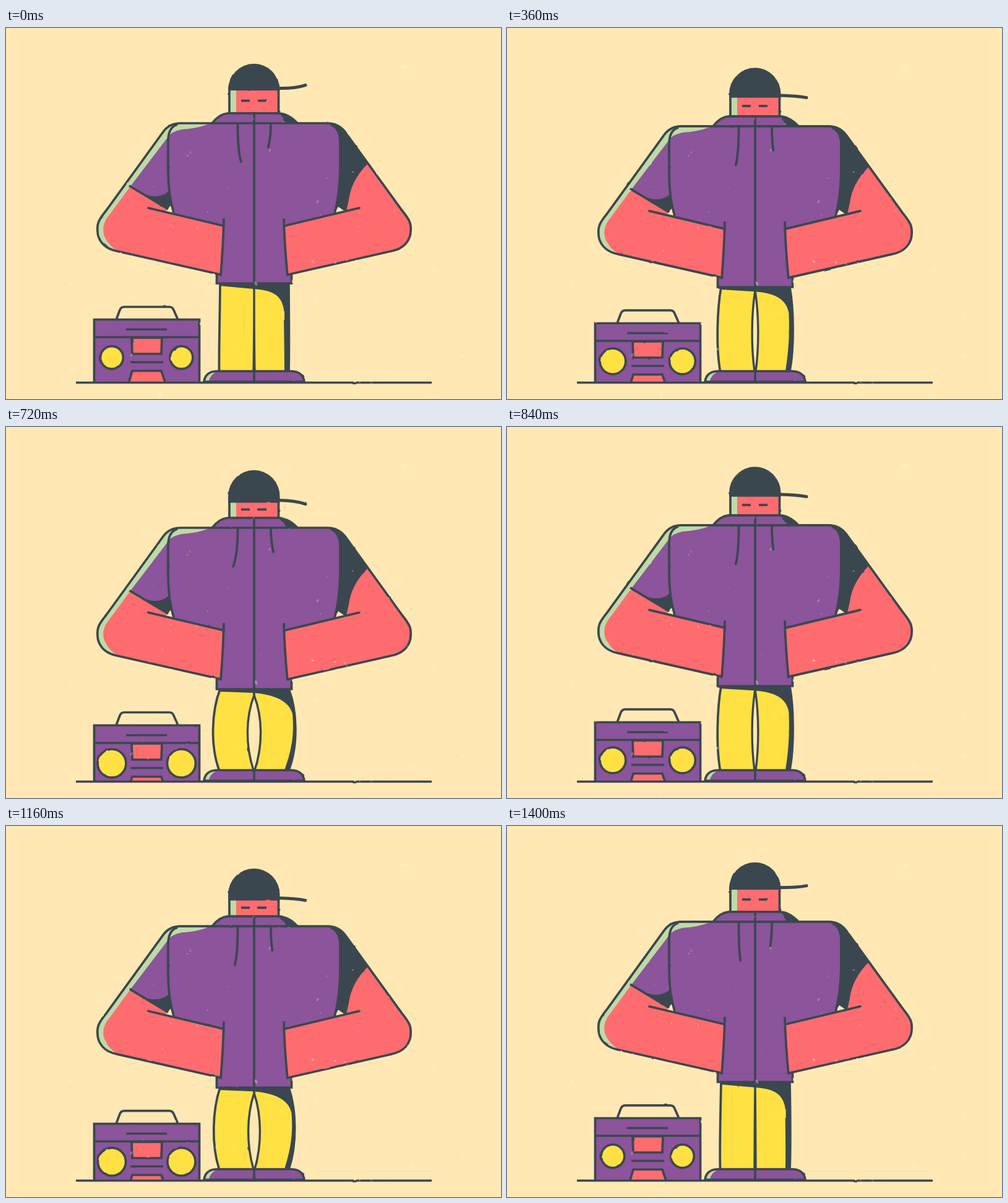
An HTML page with a canvas that plays this animation: 800x600 px, repeating every 1440 ms.

```html
<!DOCTYPE html>
<html lang="en">
<head>
<meta charset="utf-8">
<title>Boombox bounce</title>
<style>
  html, body { margin: 0; width: 100%; height: 100%; overflow: hidden; background: #ffe8b3; }
  canvas { display: block; filter: url(#rough); }
  svg { position: absolute; }
</style>
</head>
<body>
<svg width="0" height="0">
  <filter id="rough" x="0" y="0" width="100%" height="100%" color-interpolation-filters="sRGB">
    <feTurbulence type="fractalNoise" baseFrequency=".07" numOctaves="1" seed="4"/>
    <feDisplacementMap in="SourceGraphic" scale="2.2" xChannelSelector="R" yChannelSelector="G"/>
    <feGaussianBlur stdDeviation=".4" edgeMode="duplicate"/>
  </filter>
</svg>
<canvas width="800" height="600"></canvas>
<script>
const ctx = document.querySelector('canvas').getContext('2d');
const LOOP = 1440, BEAT = 480, STEP = 40;
const CREAM = '#ffe8b3', INK = '#3b474f', PURPLE = '#8b549b',
      RED = '#ff6c70', YELLOW = '#ffe144', GREEN = '#bfdaa5';

const fill = (d, color) => { ctx.fillStyle = color; ctx.fill(new Path2D(d)); };
const line = (d, width = 3.7) => { ctx.lineWidth = width; ctx.stroke(new Path2D(d)); };
const shape = (d, color) => { fill(d, color); line(d); };
const shifted = (dy, draw) => { ctx.save(); ctx.translate(0, dy); draw(); ctx.restore(); };

let seed = 7;
const random = () => (seed = seed * 16807 % 2147483647) / 2147483647;
const specks = Array.from({ length: 130 }, () => ({
  x: random() * 800, y: random() * 600, r: .6 + random() ** 3 * 1.8,
  angle: random() * 3, alpha: .08 + random() * .35
}));

function paper() {
  for (const { x, y, r, angle, alpha } of specks) {
    ctx.fillStyle = `rgba(255,246,220,${alpha})`;
    ctx.beginPath();
    ctx.ellipse(x, y, r * 1.7, r, angle, 0, 7);
    ctx.fill();
  }
}

function boombox(s) {
  ctx.save();
  ctx.beginPath();
  ctx.rect(130, 440, 200, 133);
  ctx.clip();
  shifted(10.5 * s, () => line('M178 472L184 456Q186 451 191 451H264Q269 451 271 456L278 472'));
  shifted(11 * s, () => {
    shape('M142.5 471.5H312.5V600H142.5Z', PURPLE);
    line('M142 500H313M194 487.5H260M201 540.5H254');
    shape('M203 501H252L251 527H204Z', RED);
    shape('M204 554.5H251L258 575H198Z', RED);
    for (const x of [171, 283.5]) {
      ctx.beginPath();
      ctx.arc(x, 533, 18.4 + 4.6 * s, 0, 7);
      ctx.fillStyle = YELLOW;
      ctx.fill();
      ctx.stroke();
    }
  });
  ctx.restore();
}

function legs(s) {
  const hip = 413 + 11 * s, bulge = 10.5 * s ** 1.3, c = bulge * 4 / 3;
  const y1 = hip + 36, y2 = 516, split = hip + 10 * s;
  const left = `C${346 - c} ${y1} ${344 - c} ${y2} 344.5 555`;
  const right = `C${457 + c} ${y1} ${458 + c} ${y2} 457 555`;
  const gap = `M401 ${split}C${401 - c} ${y1 + 10} ${401 - c} ${y2} 400 555H402` +
              `C${401 + c} ${y2} ${401 + c} ${y1 + 10} 401 ${split}`;
  const edge = 449 + bulge * 1.35;
  fill(`M346 ${hip}${left}H457C${458 + c} ${y2} ${457 + c} ${y1} 457 ${hip}Z`, YELLOW);
  fill(`M346 ${hip}H457${right}H450C${450 + c} ${y2} ${edge + bulge * .2} ${hip + 70} ${edge} ${hip + 42}` +
       `C${edge - 4} ${hip + 17} 428 ${hip + 11 - 3 * s} 400 ${hip + 9 - 3 * s}L346 ${hip + 4}Z`, INK);
  fill(gap, CREAM);
  line(`M346 ${hip}${left}M457 ${hip}${right}M401 ${hip}V${split}`);
  line(gap, 3.4);
}

function shoes() {
  const sole = 'M320 572Q322 556 340 555H462Q480 556 482 572Z';
  fill(sole, PURPLE);
  fill('M322 571Q324 557 340 556Q329 562 328 571Z', GREEN);
  line(sole);
  line('M401 555V572');
  line('M113 573.5H688');
}

function head(s, swing) {
  const top = 58 + 12 * s, base = 101 + 21.5 * s, chin = 138 + 9.5 * s;
  const eyes = 117.5 + 16 * s, brim = 97.5 + 21 * s;
  const face = `M361 ${base - 4}H440.5V${chin}H361Z`;
  fill(face, RED);
  fill(`M361 ${base - 4}H372V${chin}H361Z`, GREEN);
  line(face);
  fill(`M359 ${base}V${top + 42}A41.5 42 0 0 1 442.5 ${top + 42}V${base}Z`, INK);
  line(`M380 ${eyes}H394M407 ${eyes}H421`);
  ctx.lineCap = 'round';
  line(`M440 ${brim}Q468 ${brim + .5} 484 ${brim + .5 + 6.5 * swing}`, 5);
  ctx.lineCap = 'butt';
}

function torso(s, swing) {
  const hem = 413 + 2 * s;
  const arms = 'M348 399L180 361C164 358 152 349 148.5 334C146 317 149 311 162 295L254 168' +
               'Q264 154 282 154H520Q537 154 548 168L640 295C653 311 656 317 653.5 334C650 349 638 358 622 361L455 399';
  const chest = 'M282 154H520Q540 160 540 184V230Q539 270 531 300L450 320L455 400H347L352 320' +
                'L271 300Q262 270 262 230V184Q262 160 282 154Z';
  const collar = 'M333 154Q345 139 358 138H440Q456 138 471 154';

  shape(`M340.5 398H461.5V${hem}H340.5Z`, PURPLE);
  fill(arms, RED);

  fill('M199 255L218 219L254 168Q264 154 282 154L270 286L262 293Z', PURPLE);
  fill('M222 268Q247 278 263 264L270 286L262 294Z', INK);
  fill('M520 154Q537 154 548 168L585 219Q558 246 554 278L550 296L532 292Z', INK);
  fill('M266 287L258 297L272 300Z', CREAM);
  fill('M537 289L531 300L547 296Z', CREAM);
  fill(chest, PURPLE);

  fill('M328 155Q308 163 284 164Q268 167 262 176L201 256L168 301C153 318 151 340 180 361' +
       'C164 358 152 349 148.5 334C146 317 149 311 162 295L254 168Q264 154 282 154Z', GREEN);
  line('M199 255L262 293');

  fill(collar, PURPLE);
  fill('M440 138Q456 138 471 154H453Q449 143 440 138Z', INK);
  line(collar);

  line(arms);
  line('M277 156Q262 160 262 184V230Q262 270 271 299M525 156Q540 162 540 184V230Q539 270 531 300');
  line('M352 308Q351 350 347 401M449 308Q450 350 455 401');
  line(`M401 138V${hem}`);
  ctx.lineCap = 'round';
  line('M230 291L352 320M571 291L450 320');
  line(`M374.5 156Q374.5 198 ${373.5 - 7.4 * swing} 216.5M428 156Q428 176 ${428 + 4.8 * swing} 193`);
  ctx.lineCap = 'butt';
}

function draw(now) {
  const time = Math.floor(now % LOOP / STEP) * STEP;
  const phase = time / BEAT * 2 * Math.PI;
  const squat = (1 - Math.cos(phase - .087)) / 2;
  const swing = -Math.cos(phase - Math.PI / 6);   // cap brim and cords trail behind the body
  ctx.fillStyle = CREAM;
  ctx.fillRect(0, 0, 800, 600);
  ctx.strokeStyle = INK;
  boombox(squat);
  legs(squat);
  shoes();
  head(squat, swing);
  shifted(9 * squat, () => torso(squat, swing));
  paper();
}

const start = performance.now();
function tick() {
  draw(performance.now() - start);
  requestAnimationFrame(tick);
}
tick();
</script>
</body>
</html>
```
